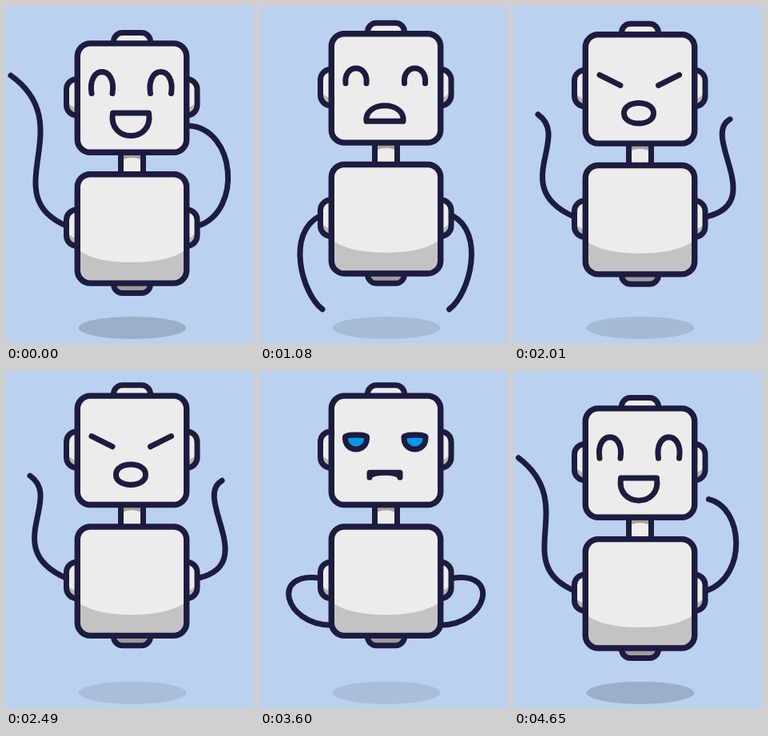
An HTML page that plays this animation: 310 px wide and 422 px high, repeating every 4680 ms.

```html
<!DOCTYPE html>
<html>
<head>
<meta charset="utf-8">
<title>Robot moods</title>
<style>
  html, body { margin: 0; height: 100%; overflow: hidden; background: #bad2ef; }
  svg { display: block; }
  .line { stroke: #1c1c40; stroke-width: 7; stroke-linecap: round; stroke-linejoin: round; }
  .shell { stroke-width: 7.4; }
</style>
</head>
<body>
<svg width="310" height="422" viewBox="0 0 310 422">
  <defs>
    <g id="nub">
      <rect x="75.5" y="91.5" width="40" height="45.5" rx="13" fill="#ececec"/>
      <path d="M76 119Q82 127 90 128V137H86Q76 135 76 119Z" fill="#b9b9b9"/>
      <rect class="line" x="75.5" y="91.5" width="40" height="45.5" rx="13" fill="none"/>
    </g>
    <g id="sides">
      <use href="#nub"/>
      <use href="#nub" transform="matrix(-1 0 0 1 314.5 0)"/>
    </g>
  </defs>
  <ellipse id="shadow" cx="158" cy="403" rx="67.5" ry="14"/>
  <g id="robot">
    <use href="#sides"/>
    <use href="#sides" y="163.5"/>
    <rect class="line" x="134.5" y="33.5" width="46" height="30" rx="11" fill="#ececec"/>
    <rect class="line" x="134.5" y="329.5" width="46" height="30" rx="11" fill="#9c9c9e"/>
    <rect class="line" x="143.5" y="178" width="28" height="40" fill="#ececec"/>
    <path d="M147 185H168V192Q157 188 147 192Z" fill="#a8a09b"/>
    <rect class="line shell" x="89.3" y="46.9" width="136.4" height="136.4" rx="16" fill="#ececec"/>
    <rect x="89.3" y="210.7" width="136.4" height="136.4" rx="16" fill="#ececec"/>
    <path d="M90 305Q110 321 157 321T225 305V331Q225 347 209 347H106Q90 347 90 331Z" fill="#c3c3c3"/>
    <rect class="line shell" x="89.3" y="210.7" width="136.4" height="136.4" rx="16" fill="none"/>
    <path id="eyeL" class="line" fill="#0a97e4"/>
    <path id="eyeR" class="line" fill="#0a97e4"/>
    <path id="mouth" class="line" fill="#ececec"/>
    <path id="armL" class="line" fill="none"/>
    <path id="armR" class="line" fill="none"/>
  </g>
</svg>
<script>
const LOOP = 4680, AXIS = 157.25;
const part = id => document.getElementById(id);

// Features: y, half width, tilt, upper bulge, lower bulge, corner leg
const faces = {
  smile: { eye: [109.5, 13, 0, 36, 36, 0], mouth: [134, 22.5, 0, 0, -38, 0] },
  sad:   { eye: [109, 13, 0, 25, 25, 0], mouth: [156.5, 23, 0, 26, 0, 0] },
  angry: { eye: [104, 13, 6.5, 0, 0, 0], mouth: [145.5, 18.5, 0, 17, -17, 0] },
  wink:  { eye: [101.5, 11.5, 0, 15.5, -15.5, 0], eyeL: [104.5, 11, 3, 2, 2, 0], mouth: [143, 18, 0, 0, -23, 0] },
  bored: { eye: [98, 13.5, 0, 3, -21, 0], mouth: [149, 19, 0, 0, 8, 6] }
};

// Arms: two points on the way and the hand; a missing right arm mirrors the left
const arms = {
  waveOut: { left: [[37, 223], [43, 155], [6, 87]], right: [[275, 235], [270, 180], [229, 150]] },
  waveIn:  { left: [[25, 235], [23, 160], [36, 99]], right: [[275, 237], [268, 188], [228, 158]] },
  hang:    { left: [[51, 310], [56, 357], [78, 392]] },
  fists:   { left: [[36, 232], [42, 185], [30, 147]], right: [[274, 240], [263, 190], [270, 153]] },
  crossed: { left: [[75, 284], [148, 299], [211, 285]], right: [[243, 259], [185, 250], [120, 262]] },
  hips:    { left: [[38, 286], [45, 316], [88, 334]] },
  swing:   { left: [[45, 260], [25, 240], [4, 210]] }
};

const bobKeys = [0, 780, 1560, 2340, 3000, 3780, LOOP].map((t, i) => [t, [i % 2 * -18]]);

const faceKeys = [
  [0, "smile"], [840, "smile"], [1080, "sad"], [1590, "sad"], [1980, "angry"], [2580, "angry"],
  [2940, "wink"], [3150, "wink"], [3480, "bored"], [4330, "bored"], [LOOP, "smile"]
];

const waves = Array.from({ length: 5 }, (_, i) => [i * 210, i % 2 ? "waveIn" : "waveOut"]);
const armKeys = [
  ...waves, [1080, "hang"], [1560, "hang"], [1980, "fists"], [2580, "fists"], [2940, "crossed"],
  [3180, "crossed"], [3510, "hips"], [4340, "hips"], [4575, "swing"], [LOOP, "waveOut"]
];

function tween(keys, t, pick) {
  const i = keys.findIndex(key => key[0] > t);
  const [t0, from] = keys[i - 1], [t1, to] = keys[i];
  const k = (1 - Math.cos(Math.PI * (t - t0) / (t1 - t0))) / 2;
  const a = pick(from), b = pick(to);
  return a.map((v, j) => v + (b[j] - v) * k);
}

// Closed shape of an upper and a lower curve; deep curves get square shoulders
function feature(cx, side, [y, half, tilt, up, low, leg]) {
  const x0 = cx - half, x1 = cx + half, y0 = y - side * tilt, y1 = y + side * tilt;
  const flare = bulge => Math.max(0, Math.abs(bulge) - 16) / 3.5;
  const f = flare(up), g = flare(low);
  return `M${x0} ${y0}V${y0 - leg}C${x0 - f} ${y0 - leg - up} ${x1 + f} ${y1 - leg - up} ${x1} ${y1 - leg}` +
    `V${y1}C${x1 + g} ${y1 - low} ${x0 - g} ${y0 - low} ${x0} ${y0}Z`;
}

// Cubic that passes through a and b at its thirds
function curve(shoulder, [ax, ay, bx, by, hx, hy]) {
  const a = [ax, ay], b = [bx, by], hand = [hx, hy];
  const c1 = shoulder.map((s, n) => (-5 * s + 18 * a[n] - 9 * b[n] + 2 * hand[n]) / 6);
  const c2 = shoulder.map((s, n) => (2 * s - 9 * a[n] + 18 * b[n] - 5 * hand[n]) / 6);
  return `M${shoulder}C${c1} ${c2} ${hand}`;
}

const mirror = points => points.map(([x, y]) => [2 * AXIS - x, y]);
const leftArm = name => arms[name].left.flat();
const rightArm = name => (arms[name].right || mirror(arms[name].left)).flat();

function draw(t) {
  const [bob] = tween(bobKeys, t, v => v);
  const face = pick => tween(faceKeys, t, name => pick(faces[name]));
  const shape = (id, d) => part(id).setAttribute("d", d);
  part("robot").setAttribute("transform", `translate(0 ${bob})`);
  part("shadow").setAttribute("fill-opacity", 0.165 + bob * 0.0045);
  shape("eyeL", feature(120, 1, face(f => f.eyeL || f.eye)));
  shape("eyeR", feature(193.5, -1, face(f => f.eye)));
  shape("mouth", feature(156, 0, face(f => f.mouth)));
  shape("armL", curve([75, 275], tween(armKeys, t, leftArm)));
  shape("armR", curve([241, 275], tween(armKeys, t, rightArm)));
}

const start = performance.now();
function tick() {
  draw((performance.now() - start) % LOOP);
  requestAnimationFrame(tick);
}
tick();
</script>
</body>
</html>
```
